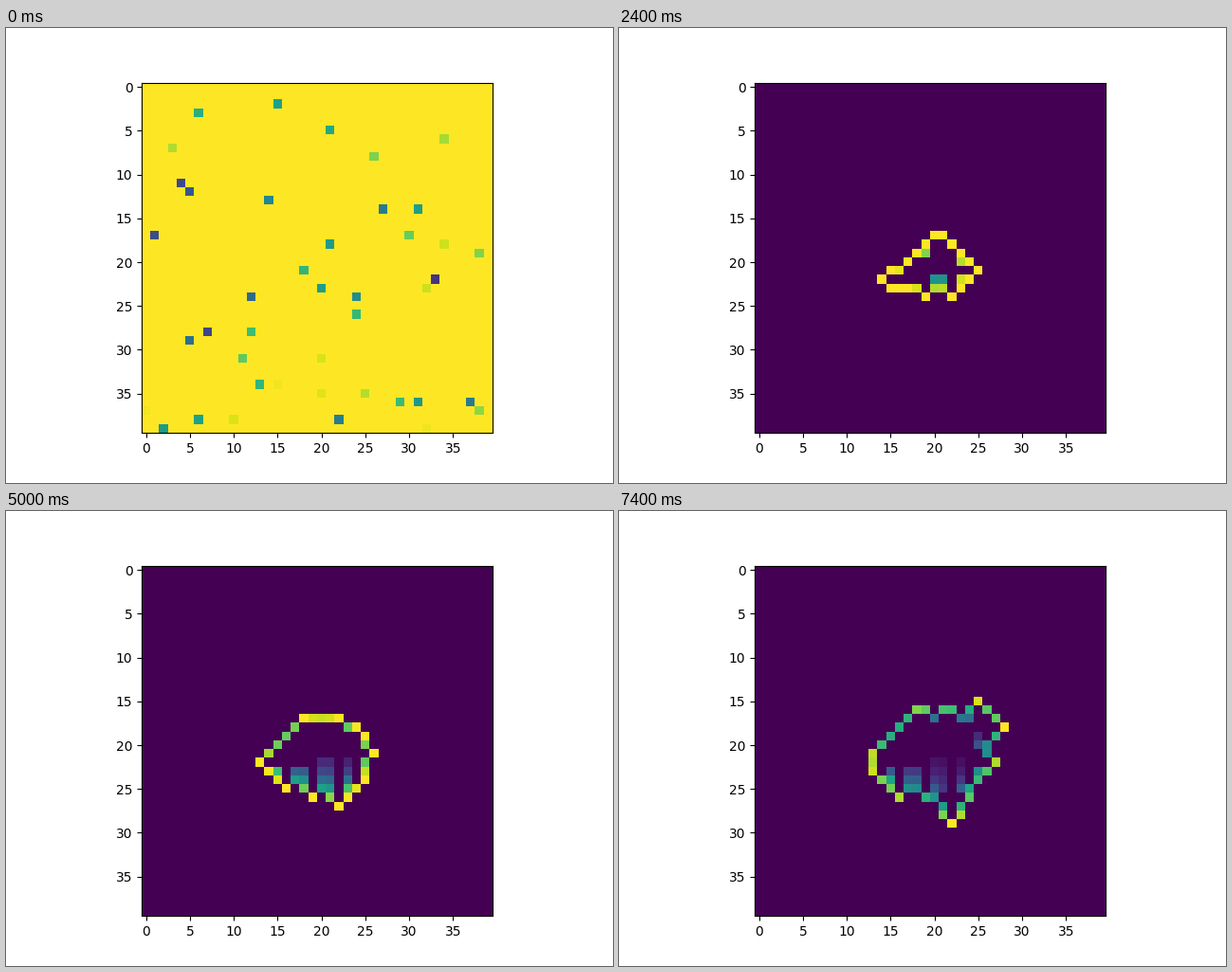
Write a matplotlib script that moves like this. It is 640 by 480 pixels and loops after 7500 ms.

```python
import numpy as np
import matplotlib.pyplot as plt
from matplotlib.animation import FuncAnimation

SIZE = 40
STEPS = 75
ETA = 0.5      # growth exponent
GAIN = 31.5    # colour scale for the growth probability
EASE = 1.3     # branches slow down as they lengthen
SPECKS = 42

# Branches of the cluster: first cell, last cell (column, row), start, end
BRANCHES = [
    ((20, 20), (20, 18), 1, 11),     # stem
    ((22, 20), (21, 18), 16, 22),    # shoulder
    ((20, 21), (25, 21), 0, 32),     # east arm
    ((19, 22), (14, 22), 4, 28),     # west arm
    ((16, 22), (16, 25), 32, 54),    # fingers
    ((19, 22), (19, 25), 3, 47),
    ((22, 22), (22, 28), 14, 64),
    ((24, 22), (24, 24), 28, 42),
    ((21, 26), (23, 26), 56, 60),
    ((14, 22), (14, 23), 28, 66),
    ((25, 22), (26, 22), 51, 63),
    ((24, 18), (27, 18), 52, 67),    # horn
    ((25, 18), (25, 16), 57, 71),
    ((26, 17), (26, 19), 70, 73),
]


def dome(col, row):
    """Time at which the rounded upper part reaches each cell."""
    x, y = col - 20, 21 - row
    time = 13 * y + np.where(x < 0, 1.75, 1.3) * x ** 2
    inside = (y >= 0) & (y <= 4) & (x <= 4) & (abs(x) + y <= 6) & (x != 0)
    return np.where(inside, time, np.inf)


def birth_times():
    row, col = np.indices((SIZE, SIZE))
    birth = dome(col, row)
    for a, b, start, end in BRANCHES:
        a, b = np.array(a), np.array(b)
        count = abs(b - a).max()
        for s in np.linspace(0, 1, count + 1):
            c, r = np.round(a + (b - a) * s).astype(int)
            birth[r, c] = min(birth[r, c], start + (end - start) * s ** EASE)
    return birth


def green_matrix(m):
    """Inverse of the discrete Laplacian on an m by m grid."""
    line = 2 * np.eye(m) - np.eye(m, k=1) - np.eye(m, k=-1)
    eye = np.eye(m)
    return np.linalg.inv(np.kron(line, eye) + np.kron(eye, line))


INNER = SIZE - 2
GREEN = green_matrix(INNER)
BIRTH = birth_times()


def potential(body):
    """Laplace field: 1 on the border, 0 on the cluster."""
    idx = np.flatnonzero(body[1:-1, 1:-1])
    charge = np.linalg.solve(GREEN[np.ix_(idx, idx)], np.ones(len(idx)))
    phi = np.ones((SIZE, SIZE))
    phi[1:-1, 1:-1] -= (GREEN[:, idx] @ charge).reshape(INNER, INNER)
    return np.clip(phi, 0, 1)


def perimeter(body):
    near = np.zeros_like(body)
    for axis in (0, 1):
        for step in (-1, 1):
            near |= np.roll(body, step, axis)
    return near & ~body


def opening():
    """Full field with a sparse scatter of lower levels."""
    rng = np.random.default_rng(4)
    grid = np.ones(SIZE * SIZE)
    spots = rng.choice(grid.size, SPECKS, replace=False)
    grid[spots] = rng.random(SPECKS) ** 0.6
    return grid.reshape(SIZE, SIZE)


def field(n):
    if n == 0:
        return opening()
    body = BIRTH <= n
    weight = np.where(perimeter(body), potential(body) ** ETA, 0)
    return GAIN * weight / weight.sum()


fig, ax = plt.subplots(figsize=(6.4, 4.8), dpi=100)
image = ax.imshow(field(0), vmin=0, vmax=1)


def update(n):
    image.set_data(field(n))
    return [image]


anim = FuncAnimation(fig, update, frames=STEPS, interval=100, repeat=True)
plt.show()
```
